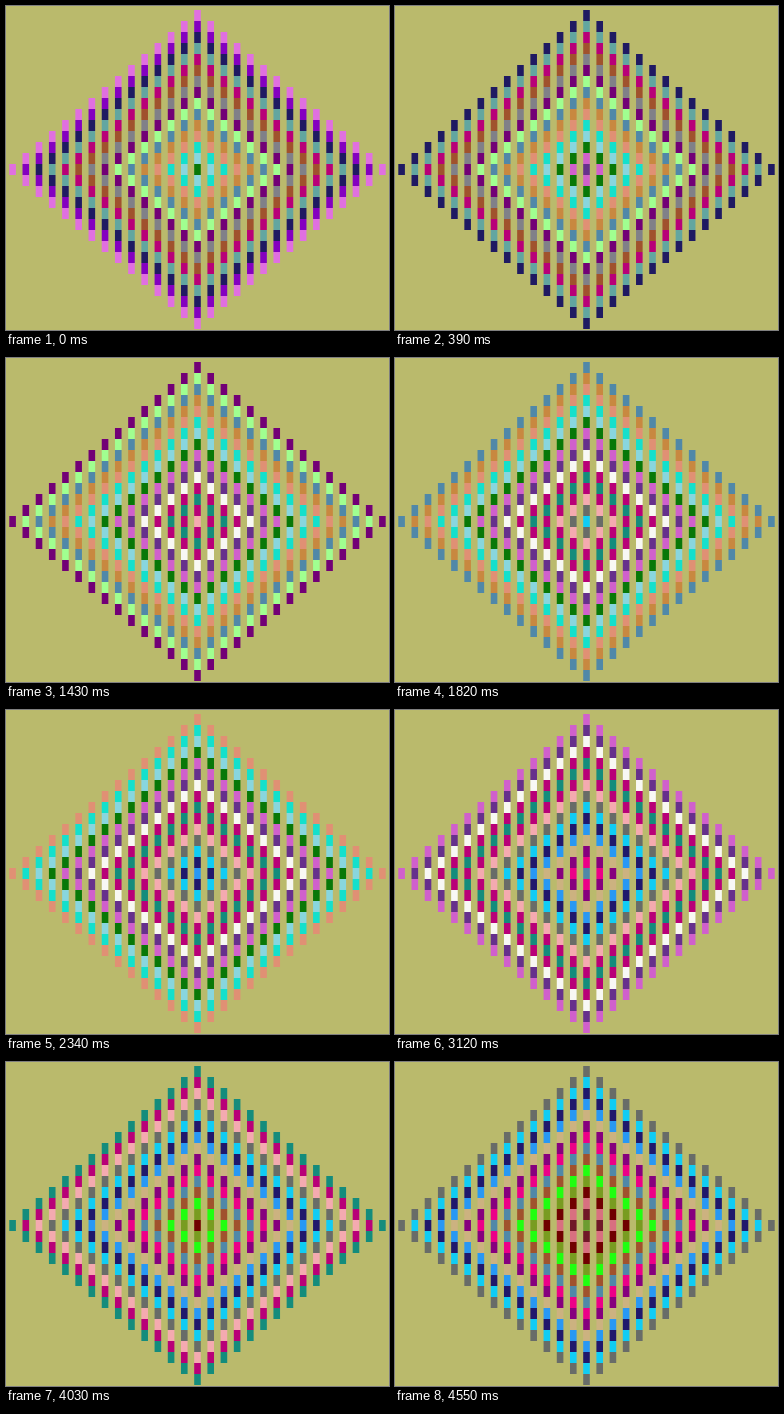
Write an HTML page with a canvas that moves like this. It is 383x324 px and loops after 4.68 s.

```html
<!DOCTYPE html>
<html lang="en">
<head>
<meta charset="utf-8">
<title>Diamond colour waves</title>
<style>
  html, body { margin: 0; width: 100%; height: 100%; overflow: hidden; background: #baba6c; }
  canvas { display: block; width: 383px; height: 324px; }
</style>
</head>
<body>
<canvas id="stage" width="383" height="324"></canvas>
<script>
const ctx = document.getElementById('stage').getContext('2d');
const LOOP = 4680, TICK = 130, STEP = 208, LEAD = 117;
const RADIUS = 14, PITCH_X = 383 / 29, PITCH_Y = 11;
const CELL_W = 6.6, CENTER_X = 191.5, CENTER_Y = 163.5;

// Colours in the order they leave the centre; the first one starts on the rim.
const COLORS = `
  #e070e0 #8400c0 #1f1a62 #62a6a0 #b80078 #a0522d #808088 #720076
  #a0ff90 #5088a8 #c88840 #e09074 #14e0cc #88d6de #087808 #d060cc
  #66308c #f8f8f4 #b80078 #148c7c #b80078 #f4aab0 #686c68 #10ccf4
  #20186c #2898f4 #ccb280 #86007e #ec0088 #5088a8 #a0522d #20ff10
  #789c20 #700000 #d87080 #701828 #6c9c30`.trim().split(/\s+/);

function draw(step) {
  ctx.fillStyle = '#baba6c';
  ctx.fillRect(0, 0, 383, 324);
  for (let col = -RADIUS; col <= RADIUS; col++) {
    const reach = RADIUS - Math.abs(col);
    const x = CENTER_X + col * PITCH_X - CELL_W / 2;
    for (let row = -reach; row <= reach; row++) {
      const ring = Math.abs(col) + Math.abs(row);
      ctx.fillStyle = COLORS[step + RADIUS - ring];
      ctx.fillRect(x, CENTER_Y + row * PITCH_Y - PITCH_Y / 2, CELL_W, PITCH_Y);
    }
  }
}

const start = performance.now();
let shown = -1;

function update() {
  const time = (performance.now() - start) % LOOP;
  const tick = Math.floor(time / TICK) * TICK;
  const step = Math.floor((tick + LEAD) / STEP);
  if (step !== shown) draw(shown = step);
  requestAnimationFrame(update);
}
update();
</script>
</body>
</html>
```
